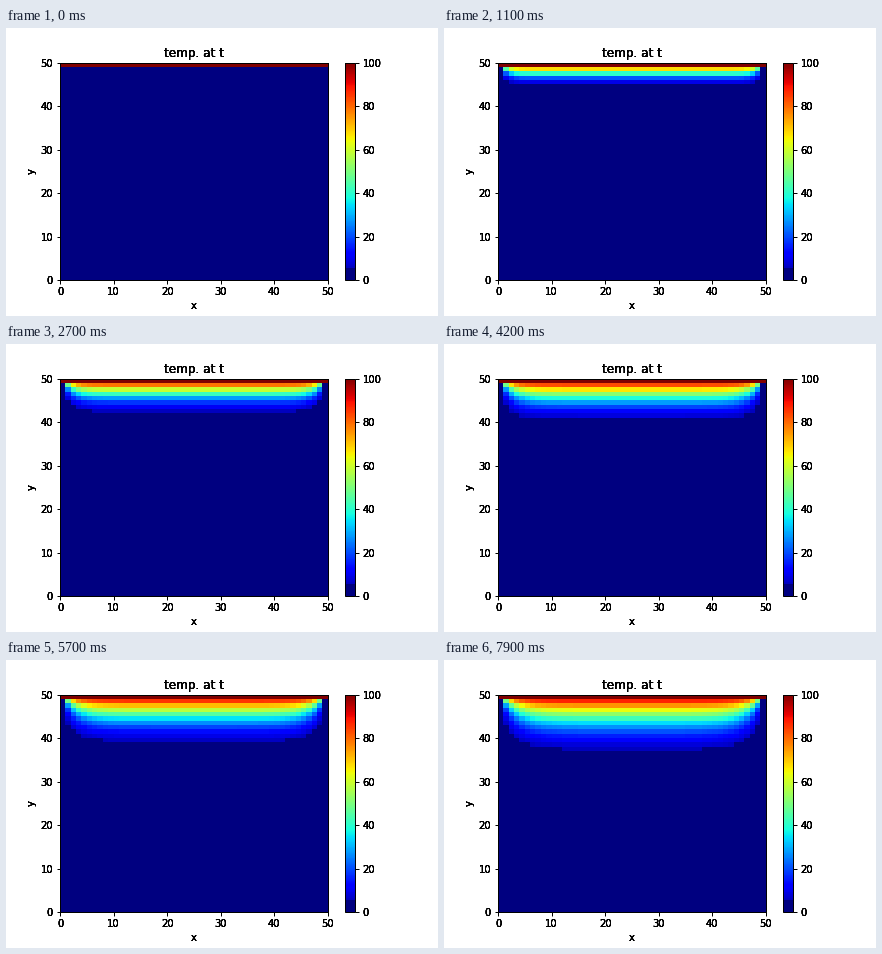
Write a matplotlib script that moves like this. It is 432 px wide and 288 px high and loops after 8000 ms.

```python
import matplotlib.pyplot as plt
import numpy as np
from matplotlib.animation import FuncAnimation
from matplotlib.colors import ListedColormap

SIZE = 50        # cells per side of the plate
STEPS = 80
GAMMA = 0.25     # diffusion number of the explicit scheme
TOP_TEMP = 100
DARK_LEVELS = 14  # lowest colours shown as one flat navy

plt.rcParams.update({
    "font.family": "DejaVu Sans",
    "font.size": 10,
    "figure.subplot.bottom": 0.125,
    "axes.linewidth": 1,
    "xtick.major.width": 1,
    "ytick.major.width": 1,
})


def diffuse(u):
    """One explicit step; the border keeps its temperature."""
    new = u.copy()
    neighbours = u[2:, 1:-1] + u[:-2, 1:-1] + u[1:-1, 2:] + u[1:-1, :-2]
    new[1:-1, 1:-1] += GAMMA * (neighbours - 4 * u[1:-1, 1:-1])
    return new


def simulate():
    u = np.zeros((SIZE, SIZE))
    u[-1] = TOP_TEMP
    states = [u]
    for _ in range(STEPS - 1):
        states.append(diffuse(states[-1]))
    return states


def flat_jet():
    colors = plt.get_cmap("jet")(np.arange(256))
    colors[:DARK_LEVELS] = colors[0]
    return ListedColormap(colors)


def thicken(text, passes=5):
    """Paint a text several times so its soft edges turn nearly black."""
    draw = text.draw

    def draw_heavy(renderer):
        for _ in range(passes):
            draw(renderer)

    text.draw = draw_heavy


states = simulate()
fig, ax = plt.subplots(figsize=(6, 4), dpi=72, facecolor="white")
mesh = ax.pcolormesh(states[0], cmap=flat_jet(), vmin=0, vmax=TOP_TEMP)
bar = fig.colorbar(mesh, ax=ax)

ax.set_title("temp. at t")
ax.set_xlabel("x")
ax.set_ylabel("y")
ax.set_xticks(range(0, 51, 10))
ax.set_yticks(range(0, 51, 10))
bar.set_ticks(range(0, 101, 20))

labels = [ax.title, ax.xaxis.label, ax.yaxis.label]
labels += ax.get_xticklabels() + ax.get_yticklabels() + bar.ax.get_yticklabels()
for label in labels:
    thicken(label)


def update(step):
    mesh.set_array(states[step])
    return [mesh]


anim = FuncAnimation(fig, update, frames=STEPS, interval=100, repeat=True,
                     repeat_delay=0, blit=False)
plt.show()
```
